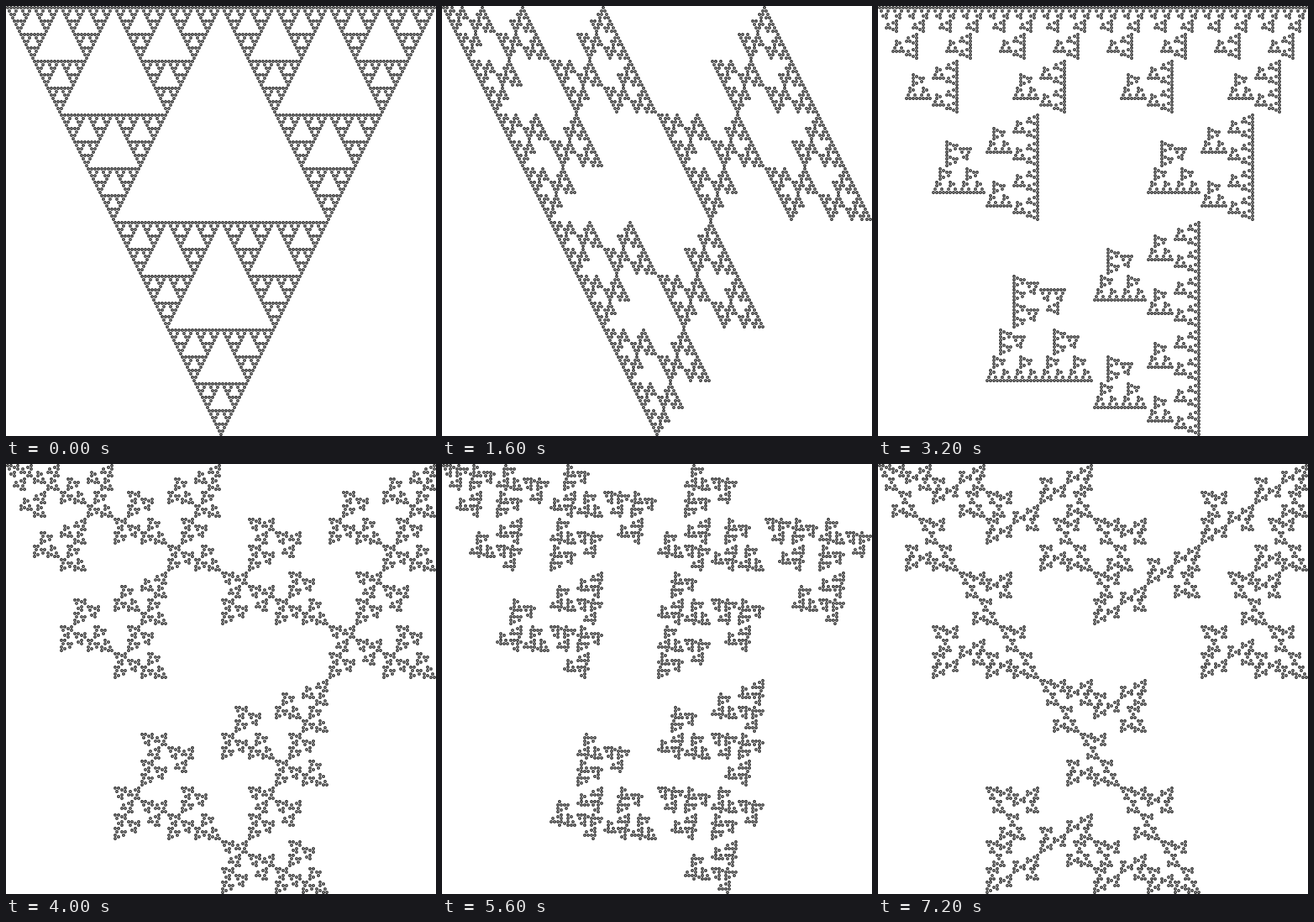
Recreate the animation shown at these times as an HTML page. Size 600 by 600 pixels, loop 8000 ms.

```html
<!DOCTYPE html>
<html lang="en">
<head>
<meta charset="utf-8">
<title>Triangle relatives</title>
<style>
html, body { margin: 0; width: 100%; height: 100%; overflow: hidden; background: #fff; }
svg { display: block; width: 600px; height: 600px; }
</style>
</head>
<body>
<svg viewBox="0 0 600 600">
  <path id="dots" fill="#b4b4b4" stroke="#2a2a2a" stroke-width="1.3"/>
</svg>
<script>
const SIZE = 600, DEPTH = 7, STEP = 800, COUNT = 10, R = 1.6;
const dots = document.getElementById('dots');

// Quarter turns clockwise inside the unit square
function turn([x, y], k) {
  for (; k > 0; k--) [x, y] = [1 - y, x];
  return [x, y];
}

// Three half-size copies: left, right and bottom, the last two turned
function relative(right, bottom) {
  const copies = [[0, 0, 0], [0.5, 0, right], [0.25, 0.5, bottom]];
  let points = [[0.5, 0.5]];
  for (let i = 0; i < DEPTH; i++) {
    points = copies.flatMap(([dx, dy, k]) => points.map(p => {
      const [x, y] = turn(p, k);
      return [dx + x / 2, dy + y / 2];
    }));
  }
  return points;
}

function circle([x, y]) {
  const left = (x * SIZE - R).toFixed(2), top = (y * SIZE).toFixed(2);
  return `M${left} ${top}a${R} ${R} 0 1 1 ${2 * R} 0a${R} ${R} 0 1 1 ${-2 * R} 0z`;
}

const paths = Array.from({ length: COUNT }, (_, n) =>
  relative(n % 4, n >> 2).map(circle).join(''));

let shown = -1;
function draw(time) {
  const n = Math.floor(time / STEP) % COUNT;
  if (n !== shown) dots.setAttribute('d', paths[shown = n]);
}

const start = performance.now();
function tick() {
  draw(performance.now() - start);
  requestAnimationFrame(tick);
}
tick();
</script>
</body>
</html>
```
